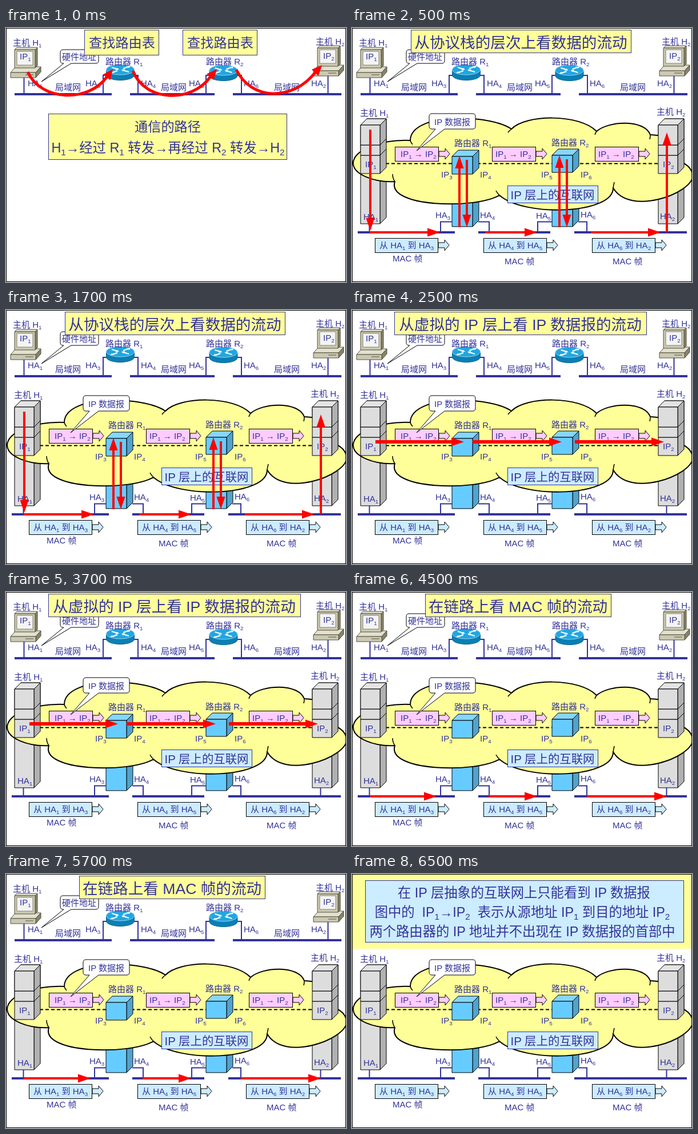
Write an HTML page that moves like this. It is 595 by 445 pixels and loops after 8000 ms.

```html
<!DOCTYPE html>
<html lang="zh-CN">
<head>
<meta charset="utf-8">
<title>数据的流动</title>
<style>
html, body { margin: 0; width: 100%; height: 100%; overflow: hidden; background: #fff; }
svg { display: block; width: 595px; height: 445px; }
text { font-family: "Liberation Sans", Arial, "Noto Sans CJK SC", "Noto Sans CJK", sans-serif; fill: #333399; white-space: pre; }
</style>
</head>
<body>
<svg id="stage" viewBox="0 0 595 445"></svg>
<script>
const NAVY = '#333399', YELLOW = '#ffff99', SKY = '#ccecff', PINK = '#ffccff', RED = '#ff0000', BLACK = '#000';

// "_1" in a label becomes a subscript
function label(x, y, s, size = 15, anchor = 'start') {
  const drop = size * 0.2;
  let shift = 0, out = '';
  for (const part of s.split(/(_\d)/)) {
    if (!part) continue;
    const sub = part[0] === '_';
    const dy = (sub ? drop : 0) - shift;
    shift += dy;
    out += `<tspan dy="${dy}"${sub ? ` font-size="${size * 0.65}"` : ''}>${sub ? part[1] : part}</tspan>`;
  }
  return `<text x="${x}" y="${y}" font-size="${size}" text-anchor="${anchor}">${out}</text>`;
}
const labels = list => list.map(a => label(...a)).join('');

const box = (x, y, w, h, fill, stroke = NAVY) =>
  `<rect x="${x + .5}" y="${y + .5}" width="${w}" height="${h}" fill="${fill}" stroke="${stroke}"/>`;

const path = (d, stroke, width, fill = 'none', extra = '') =>
  `<path d="${d}" fill="${fill}" stroke="${stroke}" stroke-width="${width}" ${extra}/>`;

const shape = (d, fill, stroke = BLACK) => path(d, stroke, 1, fill, 'stroke-linejoin="round"');

function head(x, y, angle, len = 22, half = 7.5) {
  return `<path d="M0,0 L${-len},${-half} V${half} Z" fill="${RED}" transform="translate(${x} ${y}) rotate(${angle})"/>`;
}

function arrow(x1, y1, x2, y2, w = 4) {
  const a = Math.atan2(y2 - y1, x2 - x1);
  const ex = x2 - 19 * Math.cos(a), ey = y2 - 19 * Math.sin(a);
  return path(`M${x1},${y1} L${ex},${ey}`, RED, w) + head(x2, y2, a * 180 / Math.PI);
}
const arrows = (list, w) => list.map(a => arrow(...a, w)).join('');

// Solid seen from the front with its depth to the upper right
function prism(x, y, w, h, front, side, top, d = 11) {
  return shape(`M${x},${y} l${d},${-d} h${w} l${-d},${d} Z`, top) +
    shape(`M${x + w},${y} l${d},${-d} v${h} l${-d},${d} Z`, side) +
    shape(`M${x},${y} h${w} v${h} h${-w} Z`, front);
}
const grey = (x, y, h) => prism(x, y, 34, h, '#dddddd', '#b1b1b1', '#e4e4e4');
const blue = (x, y, h) => prism(x, y, 36, h, '#66ccff', '#52a3cc', '#85d6ff');

function blockArrow(x, y, fill) {
  return shape(`M${x},${y + 5} h11 v-5 l8,9.5 l-8,9.5 v-5 h-11 Z`, fill);
}

function callout(x, y, w, h, tx, ty, a, b) {
  const r = 5;
  return shape(`M${x + r},${y} h${w - 2 * r} q${r},0 ${r},${r} v${h - 2 * r} q0,${r} ${-r},${r}
    H${b} L${tx},${ty} L${a},${y + h} H${x + r} q${-r},0 ${-r},${-r} v${-(h - 2 * r)} q0,${-r} ${r},${-r} Z`, '#fff');
}

function computer(dx, dy) {
  const edge = '#55523c', face = '#cbc9b2', light = '#e2e0cf', dark = '#86836b';
  return `<g transform="translate(${dx} ${dy})">` +
    shape('M8,78 l9,-10 h44 l-9,10 Z', light, edge) +
    shape('M52,78 l9,-10 v9 l-9,10 Z', dark, edge) +
    shape('M8,78 h44 v9 h-44 Z', face, edge) +
    path('M34,82 h14', edge, 1) +
    shape('M15,38 l4,-4 h36 l-4,4 Z', light, edge) +
    shape('M51,38 l4,-4 v32 l-4,4 Z', dark, edge) +
    shape('M15,38 h36 v32 h-36 Z', face, edge) +
    shape('M19,41 h28 v24 h-28 Z', '#f4f4f4', dark) + '</g>';
}

function router(cx, cy) {
  return `<g transform="translate(${cx} ${cy})">` +
    shape('M-24.5,0 v9.5 a24.5,9 0 0 0 49,0 v-9.5 Z', '#0b7fb4', '#07658f') +
    '<ellipse rx="24.5" ry="9" fill="#22a6e0" stroke="#9bd6ee"/>' +
    path('M-15,-4 L-5,-1 M15,4 L5,1 M5,-2 L14,-5 M-5,2 L-14,5', '#fff', 2) +
    '<path d="M-2,0 l-7,1 l4,-4 Z M2,0 l7,-1 l-4,4 Z M18,-6 l-7,0 l4,3 Z M-18,6 l7,0 l-4,-3 Z" fill="#fff"/></g>';
}

function network() {
  return path('M15,116 H185 M217,116 H365 M397,116 H587', NAVY, 4) +
    path('M31.5,86 V115 M178,83 H170 V115 M223,83 H231 V115 M358,83 H350 V115 M403,83 H412 V115 M563.5,83 V115', NAVY, 2) +
    computer(0, 0) + computer(530, -3) + router(200, 73) + router(380.5, 74) +
    callout(95, 38, 67, 24, 62, 94, 101, 114) +
    labels([
      [12, 31, '主机 H_1'], [542, 29, '主机 H_2'], [24, 55, 'IP_1'], [555, 54, 'IP_2'],
      [98, 56, '硬件地址'], [174, 64, '路由器 R_1'], [350, 64, '路由器 R_2'],
      [38, 102, 'HA_1'], [139, 102, 'HA_3'], [236, 102, 'HA_4'],
      [320, 102, 'HA_5'], [416, 102, 'HA_6'], [534, 102, 'HA_2'],
      [86, 109, '局域网'], [271, 109, '局域网'], [469, 109, '局域网']
    ]);
}

function cloud() {
  return path(`M102,197 C102,172 140,158 188,158 C225,158 262,165 279,177
    C304,151 398,150 428,181 C450,162 512,160 522,187
    C560,188 595,212 569,232 C590,239 596,250 596,260 C594,290 486,330 457,280
    C458,326 302,332 258,293 C215,318 60,314 75,269
    C38,271 2,256 2,237 C2,214 48,195 102,197 Z`, BLACK, 2, YELLOW, 'stroke-linejoin="round"') +
    path('M102,197 q1,4 4,7 M279,177 q-4,3 -6,6 M428,181 q-2,3 -3,6 M522,187 q0,5 -1,8 M569,232 q-5,5 -12,7 M457,280 q1,-6 2,-10 M258,293 q-4,-4 -6,-8 M75,269 q-4,-6 -4,-13',
      BLACK, 1.5);
}

function stack() {
  let s = grey(15, 170, 173) + grey(536, 170, 173) + blue(175, 225, 123) + blue(350, 223, 125) + cloud();
  s += path('M49,237.5 H537', BLACK, 2, 'none', 'stroke-dasharray="6 4"');
  for (const x of [15, 536]) s += grey(x, 223, 32) + grey(x, 205, 18) + grey(x, 170, 35);
  s += blue(175, 225, 31) + blue(350, 223, 30);
  s += path('M10,358 H180 M221,358 H347 M389,358 H586', NAVY, 4) +
    path('M30.5,343 V357 M175,339.5 H155 V357 M221,339.5 H240 V357 M350,339.5 H325 V357 M396,339.5 H411 V357 M550.5,343 V357', NAVY, 2);
  for (const [x, tx] of [[75, 85], [245, 251], [425, 431]])
    s += box(x, 208, 76, 25, PINK, BLACK) + blockArrow(x + 77, 211, PINK) + label(tx, 226, 'IP_1 → IP_2');
  for (const [x, a, b] of [[40, 1, 3], [230, 4, 5], [420, 6, 2]])
    s += box(x, 368, 110, 25, SKY, BLACK) + blockArrow(x + 111, 371, SKY) + label(x + 8, 386, `从 HA_${a} 到 HA_${b}`);
  return s + callout(135, 150, 81, 27, 113, 215, 146, 162) +
    box(272, 276, 158, 30, SKY) +
    labels([
      [351, 299.5, 'IP 层上的互联网', 20.4, 'middle'],
      [14, 154, '主机 H_1'], [533, 152, '主机 H_2'], [144, 170, 'IP 数据报'],
      [179, 207, '路由器 R_1'], [349, 206, '路由器 R_2'],
      [23, 244, 'IP_1'], [544, 244, 'IP_2'], [156, 262, 'IP_3'], [224, 262, 'IP_4'], [331, 262, 'IP_5'], [400, 262, 'IP_6'],
      [20, 336, 'HA_1'], [539, 335, 'HA_2'], [146, 333, 'HA_3'], [224, 333, 'HA_4'], [322, 334, 'HA_5'], [400, 332, 'HA_6'],
      [71, 409, 'MAC 帧'], [267, 414, 'MAC 帧'], [456, 414, 'MAC 帧']
    ]);
}

const title = (x, w, s) => box(x, 3, w, 40, YELLOW) + label(x + w / 2, 34.5, s, 26.6, 'middle');

function arc(x1, y1, xa, xb, c, x2, y2, tx, ty) {
  const a = Math.atan2(ty - y2, tx - x2) * 180 / Math.PI;
  return path(`M${x1},${y1} C${xa},${c} ${xb},${c} ${x2},${y2}`, RED, 5) + head(tx, ty, a, 18, 8);
}

const route = () =>
  box(137, 3, 130, 44, YELLOW) + label(203, 34, '查找路由表', 23.2, 'middle') +
  box(309, 3, 130, 44, YELLOW) + label(375, 34, '查找路由表', 23.2, 'middle') +
  box(74, 150, 417, 80, YELLOW) + label(283, 181, '通信的路径', 23.2, 'middle') +
  label(283.5, 218, 'H_1→经过 R_1 转发→再经过 R_2 转发→H_2', 23.4, 'middle') +
  arc(38, 77, 62, 146, 130, 177, 85, 187, 72) +
  arc(222, 75, 244, 326, 131, 358, 85, 369, 72) +
  arc(403, 73, 430, 502, 128, 541, 78, 553, 65);

const layers = () => title(103, 385, '从协议栈的层次上看数据的流动') + arrows([
  [32, 178, 32, 355], [31, 358, 154, 358], [188, 349, 188, 224], [201, 231, 201, 349],
  [233, 358, 324, 358], [363, 349, 363, 223], [376, 230, 376, 349],
  [418, 358, 540, 358], [551, 358, 551, 183]
], 4);

const ipFlow = () => title(74, 441, '从虚拟的 IP 层上看 IP 数据报的流动') +
  arrows([[41, 231, 196, 231], [211, 231, 367, 231], [390, 231, 546, 231]], 6);

const macFlow = () => title(128, 325, '在链路上看 MAC 帧的流动') +
  arrows([[31, 358, 148, 358], [239, 358, 324, 358], [411, 358, 551, 358]], 4);

const summary = () =>
  `<rect x="1" y="1" width="593" height="130" fill="${YELLOW}"/>` + box(23, 11, 557, 108, SKY) +
  labels([
    [301, 41, '在 IP 层抽象的互联网上只能看到 IP 数据报', 23.3, 'middle'],
    [298, 75, '图中的  IP_1→IP_2  表示从源地址 IP_1 到目的地址 IP_2', 23.3, 'middle'],
    [298, 108.5, '两个路由器的 IP 地址并不出现在 IP 数据报的首部中', 23.3, 'middle']
  ]);

// [content, shown from, shown until]
const LOOP = 8000;
const parts = [
  [network, 0, 6500],
  [stack, 500, LOOP],
  [route, 0, 500],
  [layers, 500, 2500],
  [ipFlow, 2500, 4500],
  [macFlow, 4500, 6500],
  [summary, 6500, LOOP]
];

const stage = document.getElementById('stage');
stage.innerHTML = '<rect width="595" height="445" fill="#fff"/>' +
  parts.map(([draw]) => `<g class="part">${draw()}</g>`).join('') +
  '<rect x=".5" y=".5" width="594" height="444" fill="none" stroke="#000"/>';
const groups = stage.querySelectorAll('.part');

const start = performance.now();
function show(now) {
  const t = Math.max(0, now - start) % LOOP;
  parts.forEach(([, from, to], i) => {
    groups[i].style.display = t >= from && t < to ? '' : 'none';
  });
  requestAnimationFrame(show);
}
show(start);
</script>
</body>
</html>
```
